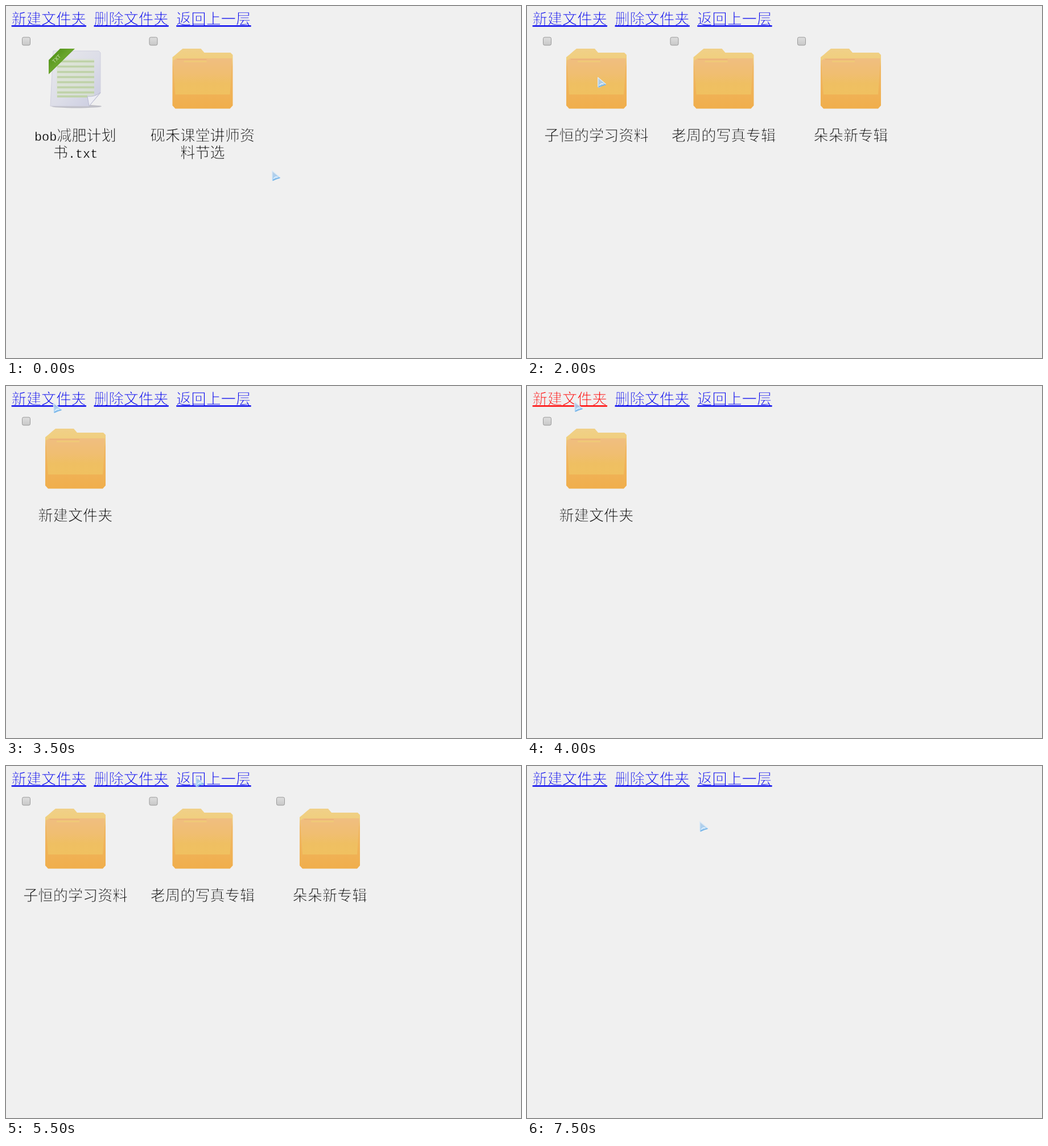
An HTML page that plays this animation: 905x619 px, repeating every 8 s.

```html
<!DOCTYPE html>
<html lang="zh-CN">
<head>
<meta charset="utf-8">
<title>文件夹</title>
<style>
  html, body { margin: 0; width: 100%; height: 100%; overflow: hidden; background: #f0f0f0; }
  svg { display: block; width: 905px; height: 619px; }
  /* the background-coloured outline thins the glyphs to a light weight */
  text { font: 300 26.2px "Noto Sans CJK SC", "Noto Sans CJK", sans-serif; stroke: #f0f0f0; stroke-width: .9; }
  .latin { font: 400 21.8px "Liberation Mono", monospace; stroke-width: .3; }
  .label { text-anchor: middle; }
  .link { fill: #00e; }
  .link.pressed { fill: #f00; }
  #document .tag { font: 700 9px Roboto, sans-serif; text-anchor: middle; fill: #a9cc84; stroke: none; }
</style>
</head>
<body>
<svg viewBox="0 0 905 619">
  <defs>
    <linearGradient id="box" x2="0" y2="1">
      <stop stop-color="#dedede"/><stop offset="1" stop-color="#c8c8c8"/>
    </linearGradient>
    <linearGradient id="front" x2="0" y2="1">
      <stop stop-color="#f0be80"/><stop offset=".45" stop-color="#f0be70"/>
      <stop offset=".7" stop-color="#efbf62"/><stop offset="1" stop-color="#f0c160"/>
    </linearGradient>
    <linearGradient id="back" x2="0" y2="1">
      <stop stop-color="#f0d088"/><stop offset=".18" stop-color="#f0cf7e"/>
      <stop offset=".3" stop-color="#f0b866"/><stop offset="1" stop-color="#f0ae4c"/>
    </linearGradient>
    <linearGradient id="paper" x2="1" y2="1">
      <stop stop-color="#e8e8ea"/><stop offset=".55" stop-color="#dcdde8"/><stop offset="1" stop-color="#c9cbe0"/>
    </linearGradient>
    <linearGradient id="ribbon" x2="1" y2="1">
      <stop stop-color="#468a10"/><stop offset=".45" stop-color="#6aa52c"/><stop offset="1" stop-color="#3d7a0a"/>
    </linearGradient>
    <linearGradient id="arrow" x2="0" y2="1">
      <stop stop-color="#b9cde4"/><stop offset="1" stop-color="#94caf6"/>
    </linearGradient>

    <g id="checkbox">
      <rect x="28.5" y="55" width="14" height="14" rx="2.5" fill="url(#box)" stroke="#999"/>
    </g>

    <g id="folder">
      <path d="M69 90 L74 86 L82 79 L87 75 H119 L125 82 H171 L175 86 V175 L170 180.5 H74 L69 175Z" fill="url(#back)"/>
      <path d="M70 96 L76 92 H174 L170 155.5 H74Z" fill="url(#front)"/>
      <path d="M77 94 H129" stroke="#ecb478" stroke-width="2"/>
      <path d="M89 97.5 H129" stroke="#f0c878" stroke-width="3"/>
    </g>

    <g id="document">
      <ellipse cx="124" cy="176.5" rx="44" ry="3" fill="#c0c0c8"/>
      <path d="M83 79 H163 L166 82 V153 L146 176 H78Z" fill="url(#paper)" stroke="#d0d0de"/>
      <path d="M89 93 H155 V161 H89Z" fill="#dbe5cc" opacity=".6"/>
      <path d="M90 97.5 H155 M90 106.5 H155 M90 116 H155 M90 125 H155 M90 134 H155 M90 143 H155 M90 152 H155 M90 159 H143"
            stroke="#bfd2a8" stroke-width="3.5"/>
      <path d="M166 152 L146 176 L143 159 Q157 160 166 152Z" fill="#ededf4" stroke="#b8bad0"/>
      <path d="M75 120 V95 L95 75 H121Z" fill="url(#ribbon)"/>
      <text class="tag" x="91" y="95" transform="rotate(-45 91 95)">TXT</text>
    </g>
  </defs>

  <g id="links"></g>
  <g id="items"></g>
  <g id="cursor">
    <path d="M.7 .8 L14.3 12.2 Q14 14 9 14.2 L3 17.8 Q.8 18 .8 16Z"
          fill="url(#arrow)" fill-opacity=".9" stroke="#dcebf7" stroke-width="1.4" stroke-linejoin="round"/>
    <path d="M1.5 17.8 L8.5 14.8 L14.5 13" fill="none" stroke="#6fb0e6" stroke-width="1.5"/>
    <path d="M3 14.5 L6.5 11.8 L10.5 11.5" fill="none" stroke="#eaf5ff" stroke-width="1.4"/>
  </g>
</svg>
<script>
const STEP = 500, PITCH = 223.5;
const byId = id => document.getElementById(id);

const folder = (...lines) => ({ icon: 'folder', lines });
const fresh = folder('新建文件夹');
const scenes = {
  root: [
    { icon: 'document', lines: ['bob减肥计划', '书.txt'] },
    folder('砚禾课堂讲师资', '料节选')
  ],
  people: [folder('子恒的学习资料'), folder('老周的写真专辑'), folder('朵朵新专辑')],
  empty: [],
  one: [fresh],
  two: [fresh, fresh]
};

// scene, cursor x, cursor y, first link held down
const steps = [
  ['root', 467, 289],
  ['root', 363, 126],
  ['people', 363, 126],
  ['people', 240, 128],
  ['people', 124, 125],
  ['empty', 124, 125],
  ['empty', 82, 39],
  ['one', 83, 29],
  ['one', 83, 27, true],
  ['two', 83, 27],
  ['two', 333, 18],
  ['people', 333, 18],
  ['people', 361, 32],
  ['people', 361, 32],
  ['people', 341, 99],
  ['empty', 303, 97]
];

const markLatin = s => s.replace(/[a-z.]+/g, '<tspan class="latin">$&</tspan>');

const drawItem = ({ icon, lines }, i) => `
  <g transform="translate(${i * PITCH})">
    <use href="#checkbox"/><use href="#${icon}"/>
    ${lines.map((s, n) => `<text class="label" x="122" y="${237 + n * 30}">${markLatin(s)}</text>`).join('')}
  </g>`;

byId('links').innerHTML = ['新建文件夹', '删除文件夹', '返回上一层'].map((s, i) => `
  <g class="link" transform="translate(${9.7 + i * 144.8})">
    <text y="32">${s}</text><rect y="34" width="131.3" height="2.4"/>
  </g>`).join('');

const firstLink = document.querySelector('.link');
const start = performance.now();
let shown = -1;

function render() {
  const index = Math.floor((performance.now() - start) / STEP) % steps.length;
  if (index !== shown) {
    const [scene, x, y, pressed = false] = steps[index];
    byId('items').innerHTML = scenes[scene].map(drawItem).join('');
    byId('cursor').setAttribute('transform', `translate(${x} ${y})`);
    firstLink.classList.toggle('pressed', pressed);
    shown = index;
  }
  requestAnimationFrame(render);
}
render();
</script>
</body>
</html>
```
